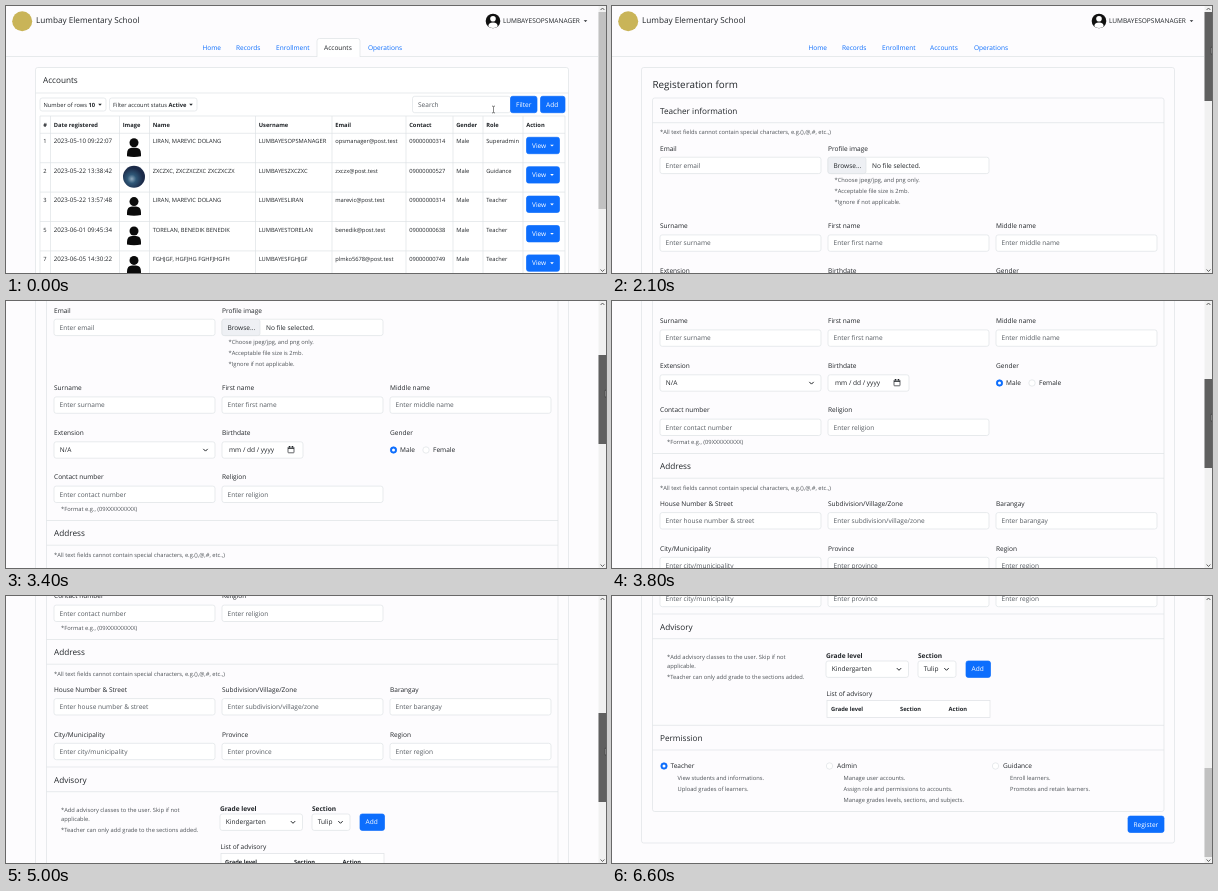
Recreate the animation shown at these times as an HTML page. Size 600 by 267 pixels, loop 6800 ms.

```html
<!DOCTYPE html>
<html lang="en">
<head>
<meta charset="utf-8">
<title>School accounts</title>
<style>
  html, body { margin: 0; width: 100%; height: 100%; overflow: hidden; background: #fdfcfe; }
  svg { display: block; width: 100vw; height: 100vh; }
  text { font-family: "Open Sans", "Noto Sans", sans-serif; text-rendering: geometricPrecision; white-space: pre; }
</style>
</head>
<body>
<svg id="stage" viewBox="0 0 600 267"></svg>
<script>
const BODY = 6.55, SMALL = 5.75, HEAD = 8.2;
const INK = '#212529', GREY = '#565c62', NOTE = '#4d5257', BLUE = '#0d6efd', LINE = '#dee2e6';

// Text is placed by its left edge and vertical centre.
const text = (x, y, s, size = BODY, fill = INK, weight = 400) =>
  `<text x="${x}" y="${y + size * .35}" font-size="${size}" fill="${fill}" font-weight="${weight}">${s}</text>`;
const box = (x, y, w, h, fill = 'none', stroke = LINE, r = 2.2) =>
  `<rect x="${x}" y="${y}" width="${w}" height="${h}" rx="${r}" fill="${fill}" stroke="${stroke}" stroke-width=".7"/>`;
const path = (d, stroke = LINE, width = .7, fill = 'none') =>
  `<path d="${d}" stroke="${stroke}" stroke-width="${width}" fill="${fill}"/>`;
const circle = (x, y, r, fill, stroke = 'none') =>
  `<circle cx="${x}" cy="${y}" r="${r}" fill="${fill}" stroke="${stroke}" stroke-width=".7"/>`;
const hline = (x1, x2, y) => path(`M${x1} ${y}H${x2}`);
const caret = (x, y, fill = INK) => path(`M${x - 1.8} ${y - .8}h3.6l-1.8 1.9z`, 'none', 0, fill);
const chevron = (x, y) => path(`M${x - 2.2} ${y - 1.1}l2.2 2.2 2.2-2.2`, INK, 1);
const button = (x, cy, w, label, pad = 5.5) =>
  box(x, cy - 8.2, w, 16.4, BLUE, BLUE) + text(x + pad, cy, label, BODY, '#fff');
const person = (x, y, fill) =>
  circle(x, y - 4.5, 4.5, fill) +
  path(`M${x - 7} ${y + 9}v-2.5q0-6 5-6h4q5 0 5 6v2.5q-7 1.5-14 0z`, 'none', 0, fill);
const notes = (x, y, lines, step = 11) =>
  lines.map((s, i) => text(x, y + i * step, s, SMALL, NOTE)).join('');
const radio = (x, y, label, gap, on) =>
  circle(x, y, 3.2, on ? BLUE : '#fff', on ? BLUE : LINE) +
  (on ? circle(x, y, 1.5, '#fff') : '') + text(x + gap, y, label);
const select = (x, cy, w, value) =>
  box(x, cy - 8.2, w, 16.4, '#fff') + text(x + 5.8, cy, value) + chevron(x + w - 9.5, cy);
const field = (x, y, label) =>
  text(x, y, label) + box(x, y + 8.9, 161, 16.4, '#fff') +
  text(x + 5.5, y + 17.1, 'Enter ' + label.toLowerCase(), BODY, GREY);

function header(active) {
  const tabs = [[196.5, 'Home'], [230, 'Records'], [270, 'Enrollment'], [318, 'Accounts'], [362, 'Operations']];
  return circle(16.2, 15.2, 10, '#c9b458') +
    text(30, 14.5, 'Lumbay Elementary School', HEAD) +
    circle(487, 15, 7.3, '#111') + circle(487, 12.8, 2.8, '#fff') +
    path('M482.3 20.4q0-4 4.7-4t4.7 4q-4.7 3.2-9.4 0z', 'none', 0, '#fff') +
    text(497, 14.7, 'LUMBAYESOPSMANAGER') + caret(579.5, 15) +
    hline(0, 592, 50.5) +
    (active ? path('M311 50.9V35q0-2.5 2.5-2.5h38q2.5 0 2.5 2.5v15.9', LINE, .7, '#fff') : '') +
    tabs.map(([x, s]) => text(x, 41.7, s, BODY, active && s == 'Accounts' ? INK : BLUE)).join('');
}

function accountsPage() {
  const cols = [34, 44.5, 113.5, 143.5, 249.5, 326, 400, 447, 477, 517, 559];
  const heads = ['#', 'Date registered', 'Image', 'Name', 'Username', 'Email', 'Contact', 'Gender', 'Role', 'Action'];
  const rows = [
    ['1', '2023-05-10 09:22:07', '', 'LIRAN, MAREVIC DOLANG', 'LUMBAYESOPSMANAGER', 'opsmanager@post.test', '09000000314', 'Male', 'Superadmin'],
    ['2', '2023-05-22 13:38:42', '', 'ZXCZXC, ZXCZXCZXC ZXCZXCZX', 'LUMBAYESZXCZXC', 'zxczx@post.test', '09000000527', 'Male', 'Guidance'],
    ['3', '2023-05-22 13:57:48', '', 'LIRAN, MAREVIC DOLANG', 'LUMBAYESLIRAN', 'marevic@post.test', '09000000314', 'Male', 'Teacher'],
    ['5', '2023-06-01 09:45:34', '', 'TORELAN, BENEDIK BENEDIK', 'LUMBAYESTORELAN', 'benedik@post.test', '09000000638', 'Male', 'Teacher'],
    ['7', '2023-06-05 14:30:22', '', 'FGHJGF, HGFJHG FGHFJHGFH', 'LUMBAYESFGHJGF', 'plmko5678@post.test', '09000000749', 'Male', 'Teacher']
  ];
  const bold = s => `<tspan font-weight="700">${s}</tspan>`;
  let out = header(true) + box(29.5, 61.5, 533, 300, '#fff') +
    text(37, 74.5, 'Accounts', HEAD) + hline(29.5, 562.5, 87) +
    box(34, 92, 66, 13, '#fff') + text(37.5, 98.6, 'Number of rows ' + bold('10'), SMALL) + caret(94, 98.6) +
    box(103.5, 92, 87.5, 13, '#fff') + text(107, 98.6, 'Filter account status ' + bold('Active'), SMALL) + caret(185, 98.6) +
    box(406.5, 90.3, 98, 16.4, '#fff') + text(412, 98.5, 'Search', BODY, GREY) +
    button(504.5, 98.5, 26.5, 'Filter') + button(534.5, 98.5, 24.5, 'Add') +
    cols.map(x => path(`M${x} 110V267`)).join('') + hline(34, 559, 110) + hline(34, 559, 127.3) +
    heads.map((s, i) => text(cols[i] + 3.2, 118.5, s, SMALL, INK, 700)).join('');
  rows.forEach((row, r) => {
    const y = 135.3 + r * 29.4;
    out += row.map((s, i) => text(cols[i] + 3.2, y, s, i == 1 ? 6.2 : SMALL)).join('') +
      (r == 1 ? circle(128, y + 6, 11, 'url(#sky)') : person(128, y + 6, '#0a0a0a')) +
      button(520.5, y + 4.2, 33, 'View') + caret(546, y + 4.2, '#fff') + hline(34, 559, y + 21.4);
  });
  return out;
}

function formPage() {
  const X = [48, 216, 384];
  const section = (y, s) => hline(40.5, 552, y - 13) + text(48, y, s, HEAD) + hline(40.5, 552, y + 11.7);
  const fields = (y, labels) => labels.map((s, i) => field(X[i], y, s)).join('');
  const hint = y => notes(48, y, ['*All text fields cannot contain special characters, e.g.(),@,#, etc.,)']);
  return header(false) + box(29.5, 61.5, 533, 647.5) + text(40.5, 78.5, 'Registeration form', 9.84) +
    box(40.5, 92, 511.5, 585.5) + text(48, 105, 'Teacher information', HEAD) + hline(40.5, 552, 116.7) + hint(125.7) +
    field(48, 142.3, 'Email') + text(216, 142.3, 'Profile image') +
    box(216, 151.2, 161, 16.4, '#fff') + box(216, 151.2, 38, 16.4, '#eef0f4') +
    text(221.5, 159.4, 'Browse...') + text(260, 159.4, 'No file selected.') +
    notes(222.5, 174, ['*Choose jpeg/jpg, and png only.', '*Acceptable file size is 2mb.', '*Ignore if not applicable.']) +
    fields(220, ['Surname', 'First name', 'Middle name']) +
    ['Extension', 'Birthdate', 'Gender'].map((s, i) => text(X[i], 265, s)).join('') +
    select(48, 282, 161, 'N/A') +
    box(216, 273.8, 81, 16.4, '#fff') + text(223, 282, 'mm / dd / yyyy') +
    box(282, 279, 6, 5.8, 'none', INK, .6) + path('M282 280.3h6M283.5 278v1.5M286.5 278v1.5', INK, 1) +
    radio(387.5, 282, 'Male', 6.5, true) + radio(420, 282, 'Female', 7) +
    fields(309.2, ['Contact number', 'Religion']) + notes(55, 341, ['*Format e.g., (09XXXXXXXXX)']) +
    section(365.5, 'Address') + hint(386.5) +
    fields(402.7, ['House Number &amp; Street', 'Subdivision/Village/Zone', 'Barangay']) +
    fields(447.4, ['City/Municipality', 'Province', 'Region']) +
    section(493, 'Advisory') +
    notes(55, 523, ['*Add advisory classes to the user. Skip if not', 'applicable.'], 9.4) +
    notes(55, 543, ['*Teacher can only add grade to the sections added.']) +
    text(214, 521.7, 'Grade level', BODY, INK, 700) + text(306, 521.7, 'Section', BODY, INK, 700) +
    select(214, 535.2, 82.5, 'Kindergarten') + select(306, 535.2, 38, 'Tulip') + button(354, 535.2, 24.5, 'Add') +
    text(214.5, 559.5, 'List of advisory') + box(215, 566.5, 163, 17, '#fff', LINE, 0) +
    [[219, 'Grade level'], [288, 'Section'], [336.5, 'Action']].map(([x, s]) => text(x, 575.3, s, SMALL, INK, 700)).join('') +
    section(604.3, 'Permission') +
    radio(52, 632, 'Teacher', 6.5, true) + radio(217.5, 632, 'Admin', 7.5) + radio(383.5, 632, 'Guidance', 7.5) +
    notes(65.5, 644, ['View students and informations.', 'Upload grades of learners.']) +
    notes(231.5, 644, ['Manage user accounts.', 'Assign role and permissions to accounts.', 'Manage grades levels, sections, and subjects.']) +
    notes(398, 644, ['Enroll learners.', 'Promotes and retain learners.']) +
    button(516, 690.3, 36, 'Register');
}

const stage = document.getElementById('stage');
stage.innerHTML = `<defs><radialGradient id="sky" cx=".4" cy=".6">
    <stop offset="0" stop-color="#8fa9bd"/><stop offset=".4" stop-color="#2f5878"/><stop offset="1" stop-color="#1b2a48"/>
  </radialGradient></defs>
  <g id="accounts">${accountsPage()}</g><g id="form">${formPage()}</g>
  <rect x="592.5" width="7.5" height="267" fill="#f1f1f1"/>
  ${path('M594.6 4l1.9-2 1.9 2M594.6 263.5l1.9 2 1.9-2', '#505050', .9)}
  <rect id="thumb" x="592.5" width="7.5"/>
  <g id="arrow">${path('M0 0v7.2l1.7-1.5 1.2 2.6 1.2-.6-1.1-2.5h2.2z', '#222', .6, '#fff')}</g>
  <g id="beam">${path('M-1.5-3.5q1.5 0 1.5 1v5q0 1-1.5 1M1.5-3.5q-1.5 0-1.5 1M0 2.5q0 1 1.5 1', '#555', .7)}</g>`;

// Piecewise linear value through [time, value] points.
function track(points, t) {
  const i = points.findIndex(p => p[0] > t);
  if (i < 0) return points[points.length - 1][1];
  if (i == 0) return points[0][1];
  const [t0, a] = points[i - 1], [t1, b] = points[i];
  return a + (b - a) * (t - t0) / (t1 - t0);
}
const scrollPath = [[2100, 0], [2800, 54], [3400, 133], [4200, 267], [5000, 309], [6000, 462]];
const cursorX = [[0, 487.5], [600, 546.5], [1400, 546.5], [2000, 599.3]];
const cursorY = [[0, 103.5], [600, 96.5], [1400, 96.5], [2000, 41]];
const [accounts, form, thumb, arrow, beam] =
  ['accounts', 'form', 'thumb', 'arrow', 'beam'].map(id => document.getElementById(id));
const show = (el, on) => el.setAttribute('visibility', on ? 'visible' : 'hidden');

function draw(now) {
  const t = Math.floor(now % 6800 / 100) * 100;
  const onForm = t >= 900, dragging = t >= 2100 && t < 6300;
  const scroll = Math.round(track(scrollPath, t)), shift = Math.round(scroll * 166 / 462);
  show(accounts, !onForm);
  show(form, onForm);
  form.setAttribute('transform', `translate(0 ${-scroll})`);
  thumb.setAttribute('y', 6 + shift);
  thumb.setAttribute('height', onForm ? 89 : 197);
  thumb.setAttribute('fill', dragging ? '#606060' : '#c1c1c1');
  const x = track(cursorX, t), typing = x < 504;
  for (const el of [arrow, beam]) el.setAttribute('transform', `translate(${x} ${track(cursorY, t) + shift})`);
  show(beam, typing);
  show(arrow, !typing && t < 6300);
}

const start = performance.now();
function tick() {
  draw(performance.now() - start);
  requestAnimationFrame(tick);
}
tick();
</script>
</body>
</html>
```
